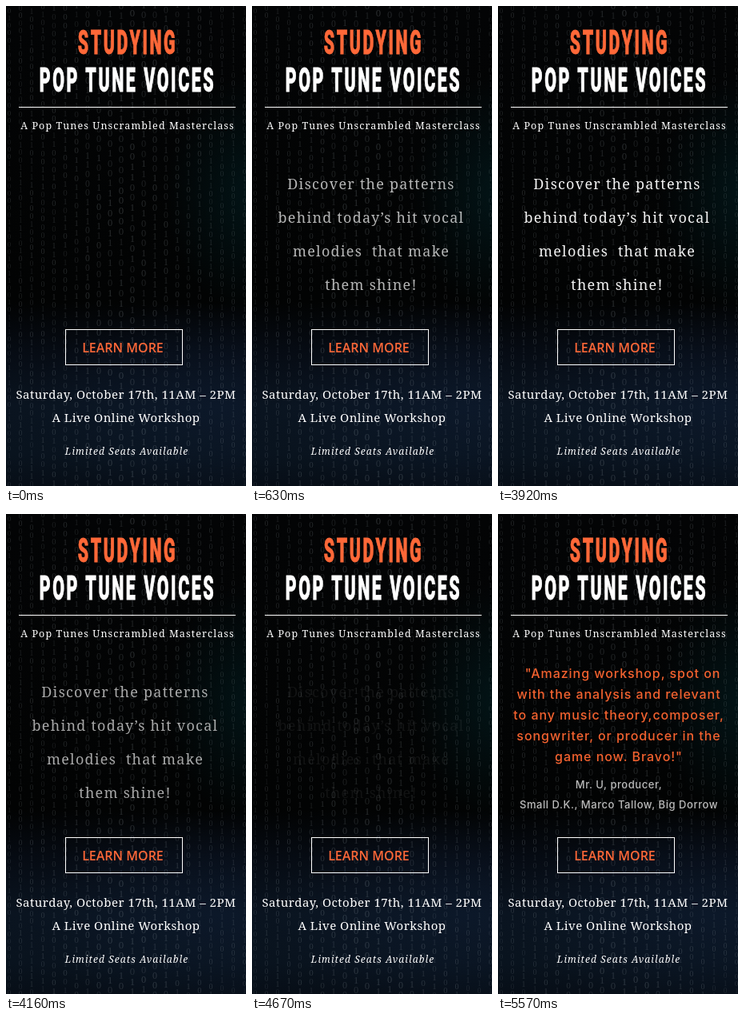
Recreate the animation shown at these times as an HTML page with a canvas. Size 300 by 600 pixels, loop 8000 ms.

```html
<!DOCTYPE html>
<html lang="en">
<head>
<meta charset="utf-8">
<title>Online masterclass banner</title>
<style>
  html, body { margin: 0; width: 100%; height: 100%; overflow: hidden; background: #020304; }
  .stage {
    position: absolute; left: 0; top: 0; width: 300px; height: 600px; overflow: hidden;
    background:
      radial-gradient(ellipse 110px 150px at 310px 235px, rgba(3, 30, 34, .65), transparent),
      radial-gradient(ellipse 240px 130px at 270px 500px, rgba(14, 28, 50, .5), transparent),
      linear-gradient(#030405 0, #020303 370px, #060b13 430px, #0a1420 500px, #09131e 560px, #070e17 600px);
  }
  canvas, svg { position: absolute; left: 0; top: 0; display: block; }
  text { text-anchor: middle; fill: #fff; white-space: pre; }
  .title { font: 900 42px Roboto, sans-serif; letter-spacing: 5px; stroke: #fff; stroke-width: .8px; }
  .hot { fill: #ff6838; }
  .title.hot { stroke: #ff6838; }
  .serif { font-family: "Noto Serif", serif; }
  .sub { font-size: 12.5px; font-weight: 500; letter-spacing: 1.1px; }
  .date { font-size: 15px; letter-spacing: .48px; }
  .seats { font-size: 12px; font-style: italic; font-weight: 500; letter-spacing: 1.05px; }
  .cta { font: 600 16px "Open Sans", sans-serif; }
  .pitch text { font-size: 18px; letter-spacing: 1.25px; }
  .quote text { font: 500 16px Inter, sans-serif; letter-spacing: .95px; fill: #f4622f; }
  .quote .credit { font-size: 13px; letter-spacing: .55px; fill: #bcbcbc; }
  .pitch { animation: pitch 8s infinite; }
  .quote { animation: quote 8s infinite; }
  @keyframes pitch {
    0% { opacity: 0; animation-timing-function: step-end; }
    .75% { opacity: 0; animation-timing-function: steps(17, start); }
    11.375% { opacity: 1; animation-timing-function: step-end; }
    49% { opacity: 1; animation-timing-function: steps(17, start); }
    59.125%, 100% { opacity: 0; }
  }
  @keyframes quote {
    0% { opacity: 0; animation-timing-function: step-end; }
    59.125% { opacity: 0; animation-timing-function: steps(28, start); }
    69.625%, 100% { opacity: 1; }
  }
</style>
</head>
<body>
<div class="stage">
  <canvas id="digits" width="300" height="600"></canvas>
  <svg width="300" height="600" viewBox="0 0 300 600">
    <text class="title hot" transform="translate(152 60) scale(.51 1)">STUDYING</text>
    <text class="title" transform="translate(152 107) scale(.51 1)">POP TUNE VOICES</text>
    <path d="M16 126.5H287" stroke="#fff"/>
    <text class="serif sub" x="152" y="154">A Pop Tunes Unscrambled Masterclass</text>

    <g class="pitch serif">
      <text x="149" y="229">Discover the patterns</text>
      <text x="149" y="271">behind today’s hit vocal</text>
      <text x="149" y="313">melodies  that make</text>
      <text x="149" y="355">them shine!</text>
    </g>

    <g class="quote">
      <text x="156" y="205">"Amazing workshop, spot on</text>
      <text x="151" y="231">with the analysis and relevant</text>
      <text x="151" y="257">to any music theory,composer,</text>
      <text x="151" y="283">songwriter, or producer in the</text>
      <text x="151" y="309">game now. Bravo!"</text>
      <text class="credit" x="151" y="343">Mr. U, producer,</text>
      <text class="credit" x="151" y="368">Small D.K., Marco Tallow, Big Dorrow</text>
    </g>

    <rect x="74.5" y="404.5" width="146" height="44" fill="none" stroke="#fff"/>
    <text class="cta hot" x="146" y="433">LEARN MORE</text>
    <g class="serif">
      <text class="date" x="150" y="491">Saturday, October 17th, 11AM – 2PM</text>
      <text class="date" x="150" y="520">A Live Online Workshop</text>
      <text class="seats" x="151" y="561">Limited Seats Available</text>
    </g>
  </svg>
</div>
<script>
  const ctx = document.getElementById("digits").getContext("2d");
  let seed = 17;
  const rand = () => (seed = (seed * 16807) % 2147483647) / 2147483647;

  // Columns of faint binary digits, larger and brighter towards the middle
  ctx.textAlign = "center";
  for (let x = 4; x < 300; x += 14) {
    const near = 1 - Math.abs(x - 150) / 150;
    const size = 9 + 4 * near;
    ctx.font = `${size}px "Liberation Serif", serif`;
    for (let y = rand() * 10; y < 606; y += size) {
      ctx.fillStyle = `rgba(190, 200, 205, ${0.09 + 0.05 * near + 0.08 * rand()})`;
      ctx.fillText(rand() < 0.6 ? "0" : "1", x, y);
    }
  }
</script>
</body>
</html>
```
